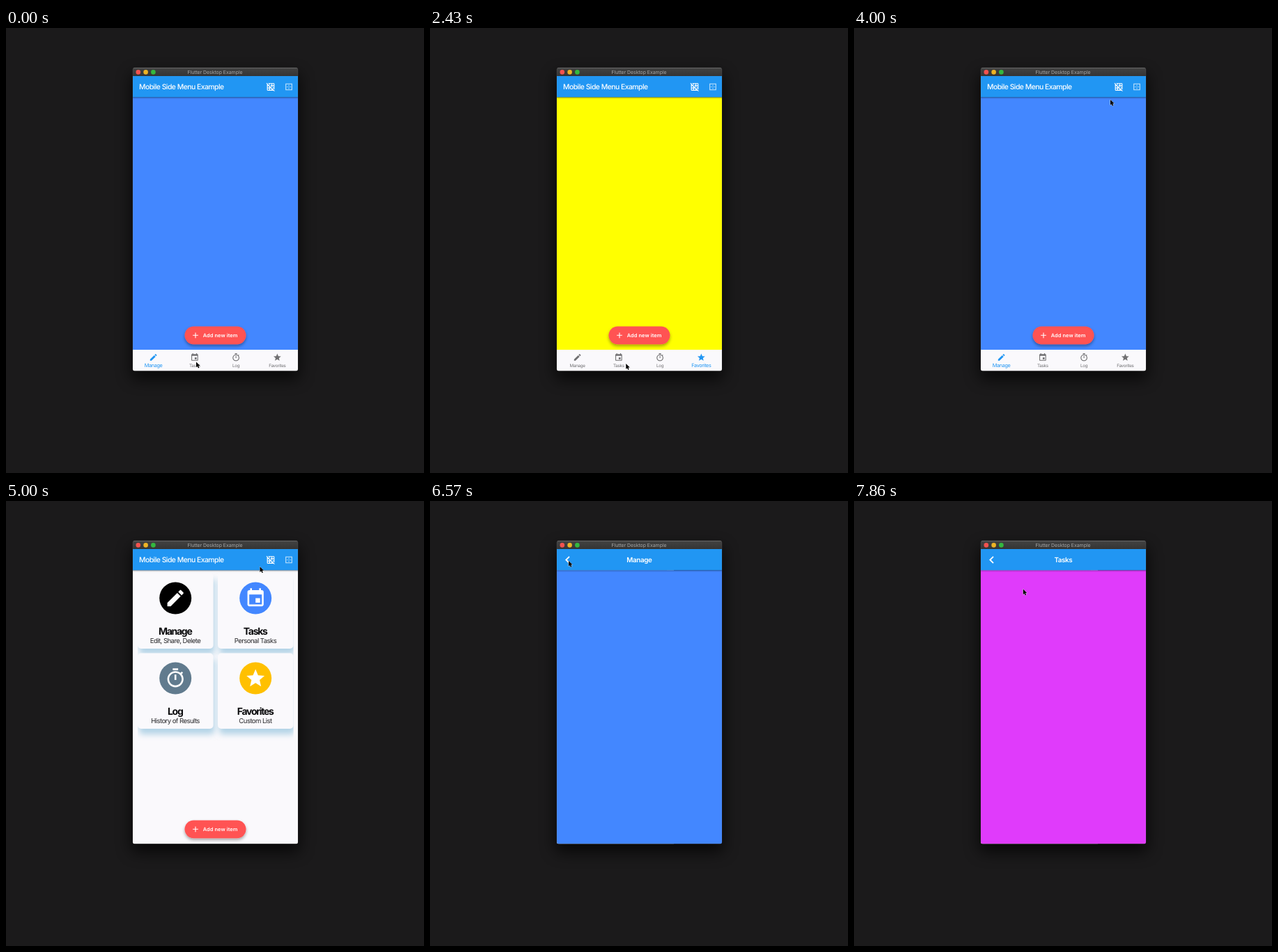
Write an HTML page that moves like this. It is 600 px wide and 639 px high and loops after 8 s.

```html
<!DOCTYPE html>
<html lang="en">
<head>
<meta charset="utf-8">
<title>Side menu demo</title>
<style>
  html, body { margin: 0; width: 100%; height: 100%; overflow: hidden; background: #1b1a1b; }
  svg { display: block; }
  text { font-family: Inter, Roboto, sans-serif; text-rendering: geometricPrecision; }
  .mid { text-anchor: middle; }
  .bar { font-size: 10.4px; font-weight: 500; letter-spacing: -.05em; fill: #fff; }
  .page { font-size: 9.9px; font-weight: 600; letter-spacing: -.04em; fill: #fff; }
  .tab { letter-spacing: -.05em; }
  .head { font-size: 14px; font-weight: 700; letter-spacing: -.09em; fill: #0c0c0e; }
  .sub { font-size: 9.6px; letter-spacing: -.06em; fill: #28282b; }
  .add { font-size: 7.4px; font-weight: 600; letter-spacing: .1px; fill: #fff; }
  .win { font-size: 7px; letter-spacing: -.01em; fill: #a9a9a9; }
</style>
</head>
<body>
<svg id="stage" width="600" height="639" viewBox="0 0 600 639"></svg>
<script>
const LOOP = 8000, FPS = 7;
const X = 182, W = 237, TOP = 69, BODY = 99.3, NAV = 462, END = 492.5;
const BLUE = '#2196f3', PAPER = '#faf9fc';

const icons = {
  edit: 'M3 17.25V21h3.75L17.81 9.94l-3.75-3.75zM20.71 7.04c.39-.39.39-1.02 0-1.41l-2.34-2.34c-.39-.39-1.02-.39-1.41 0l-1.83 1.83 3.75 3.75z',
  event: 'M17 12h-5v5h5zM16 1v2H8V1H6v2H5c-1.1 0-2 .9-2 2v14c0 1.1.9 2 2 2h14c1.1 0 2-.9 2-2V5c0-1.1-.9-2-2-2h-1V1zM19 19H5V8h14z',
  timer: 'M15 1H9v2h6zM11 14h2V8h-2zM19.03 7.39l1.42-1.42c-.43-.51-.9-.99-1.41-1.41l-1.42 1.42C16.07 4.74 14.12 4 12 4c-4.97 0-9 4.03-9 9s4.02 9 9 9 9-4.03 9-9c0-2.12-.74-4.07-1.97-5.61zM12 20c-3.87 0-7-3.13-7-7s3.13-7 7-7 7 3.13 7 7-3.13 7-7 7z',
  star: 'M12 17.27L18.18 21l-1.64-7.03L22 9.24l-7.19-.61L12 2 9.19 8.63 2 9.24l5.46 4.73L5.82 21z',
  gridOff: 'M8 4v1.45l2 2V4h4v4h-3.45l2 2H14v1.45l2 2V10h4v4h-3.45l2 2H20v1.45l2 2V4c0-1.1-.9-2-2-2H4.55l2 2H8zm8 0h4v4h-4V4zM1.27 1.27L0 2.55l2 2V20c0 1.1.9 2 2 2h15.46l2 2 1.27-1.27zM10 12.55L11.45 14H10zM4 6.55L5.45 8H4zM8 20H4v-4h4zM8 14H4v-4h3.45l.55.55zM14 20h-4v-4h3.45l.55.54zM16 20v-1.46L17.46 20z',
  border: 'M13 7h-2v2h2zM13 11h-2v2h2zM17 11h-2v2h2zM3 3v18h18V3zM19 19H5V5h14zM13 15h-2v2h2zM9 11H7v2h2z',
  plus: 'M19 13h-6v6h-2v-6H5v-2h6V5h2v6h6z'
};

const tabs = [
  { name: 'Manage', note: 'Edit, Share, Delete', icon: 'edit', page: '#4387ff', dot: '#000' },
  { name: 'Tasks', note: 'Personal Tasks', icon: 'event', page: '#e03bfb', dot: '#4387ff' },
  { name: 'Log', note: 'History of Results', icon: 'timer', page: '#000', dot: '#617b8e' },
  { name: 'Favorites', note: 'Custom List', icon: 'star', page: '#ff0', dot: '#ffc000' }
];
const tabX = i => X + W / 8 * (2 * i + 1);

// [time, tab]
const clicks = [[-1000, 0], [250, 1], [900, 2], [1300, 3], [2760, 0]];
const GRID_AT = 4400;
// Pages slid over the grid: [tab, opened, closed]
const visits = [[0, 6050, 6850], [1, 7400, 99999]];
// Pointer path: [time, x, y]
const path = [
  [0, 273, 479.5], [430, 277, 481], [710, 331, 480], [860, 331, 480], [1000, 359, 480.5],
  [1290, 388, 480], [1900, 384, 482], [2430, 281, 482], [2710, 213, 480], [3200, 211, 482],
  [4000, 368, 103], [4290, 380, 84], [4860, 380, 84], [5860, 269, 158], [6150, 266, 157],
  [6570, 199, 86], [6860, 197, 84], [7140, 267, 126.5], [7290, 340, 137], [7450, 350, 138], [7860, 242, 126.5]
];

const icon = (name, x, y, size, fill = '#fff', extra = '') =>
  `<path d="${icons[name]}" fill="${fill}" fill-rule="evenodd" ${extra}
    transform="translate(${x} ${y}) scale(${size / 24}) translate(-12 -12)"/>`;
const rect = (x, y, w, h, fill, extra = '') =>
  `<rect x="${x}" y="${y}" width="${w}" height="${h}" fill="${fill}" ${extra}/>`;
const text = (cls, x, y, s, extra = '') => `<text class="${cls}" x="${x}" y="${y}" ${extra}>${s}</text>`;
const barShade = () => rect(X, BODY, W, 3, 'url(#under)');

function tile(tab, i) {
  const x = 189 + i % 2 * 115, y = 103.5 + (i >> 1) * 115, cx = x + 54.2;
  return rect(x, y, 108.5, 108.5, PAPER, 'rx="5" filter="url(#tileShadow)"') +
    `<circle cx="${cx}" cy="${y + 36}" r="23" fill="${tab.dot}"/>` +
    icon(tab.icon, cx, y + 36, 31) +
    text('head mid', cx - .5, y + 88.3, tab.name) + text('sub mid', cx - .2, y + 100, tab.note);
}

const navItem = (tab, i) => `<g class="item">${icon(tab.icon, tabX(i), 473, 12.9, '')}
  ${text('tab mid', tabX(i), 487.3, tab.name)}</g>`;

document.getElementById('stage').innerHTML = `
<defs>
  <clipPath id="frame"><rect x="${X}" y="57" width="${W}" height="${END - 57}" rx="3"/></clipPath>
  <clipPath id="view"><rect x="${X}" y="${TOP}" width="${W}" height="${END - TOP}"/></clipPath>
  <clipPath id="list"><rect x="189" y="${BODY}" width="223.7" height="390"/></clipPath>
  <clipPath id="navClip"><rect x="${X}" y="${NAV}" width="${W}" height="31"/></clipPath>
  <linearGradient id="title" x2="0" y2="1"><stop stop-color="#434343"/><stop offset="1" stop-color="#333"/></linearGradient>
  <linearGradient id="under" x2="0" y2="1"><stop stop-opacity=".25"/><stop offset="1" stop-opacity="0"/></linearGradient>
  <linearGradient id="edge"><stop stop-opacity="0"/><stop offset="1" stop-opacity=".14"/></linearGradient>
  <filter id="tileShadow" x="-30%" y="-30%" width="160%" height="160%">
    <feDropShadow dx="2" dy="8" stdDeviation="4" flood-color="#8cc0dc" flood-opacity=".65"/></filter>
  <filter id="fabShadow" x="-20%" y="-50%" width="140%" height="220%">
    <feDropShadow dx="0" dy="2.5" stdDeviation="2" flood-opacity=".35"/></filter>
  <filter id="blur" x="-30%" y="-30%" width="160%" height="160%"><feGaussianBlur stdDeviation="11"/></filter>
</defs>
${rect(0, 0, 600, 639, '#1b1a1b')}
${rect(X - 2, 66, W + 4, 438, '#000', 'rx="5" opacity=".7" filter="url(#blur)"')}
<g clip-path="url(#frame)">
  ${rect(X, 57, W, 13, 'url(#title)')}${rect(X, 57, W, .7, '#6a6a6a')}
  ${['#f4524e', '#eeb325', '#34b83f'].map((c, i) => `<circle cx="${189.8 + i * 10.8}" cy="63.4" r="3.3" fill="${c}"/>`).join('')}
  ${text('win mid', 300, 66, 'Flutter Desktop Example')}
  <g clip-path="url(#view)">
    <g id="home">
      <g id="tabView">
        ${rect(X, BODY, W, NAV - BODY, '', 'id="body"')}
        ${rect(X, NAV, W, 31, PAPER)}
        <circle id="splash" cy="477" fill="#31506a" clip-path="url(#navClip)"/>
        ${tabs.map(navItem).join('')}
      </g>
      <g id="gridView">${rect(X, BODY, W + 10, END - BODY, PAPER)}
        <g clip-path="url(#list)">${tabs.map(tile).join('')}</g></g>
      ${barShade()}
      ${rect(X, TOP, W, BODY - TOP, BLUE)}
      ${text('bar', 191, 88.2, 'Mobile Side Menu Example')}
      ${icon('gridOff', 380, 84.5, 12.9)}${icon('border', 406, 84.5, 12.9, '#fff', 'opacity=".75"')}
      <g id="fab">${rect(256.5, 428.5, 88, 25.7, '#ff5252', 'rx="12.85" filter="url(#fabShadow)"')}
        ${icon('plus', 272, 441.3, 13.2)}${text('add', 282.7, 444.1, 'Add new item')}</g>
    </g>
    <g id="page">
      ${rect(X - 10, TOP, 10, END - TOP, 'url(#edge)')}
      ${rect(X, BODY, W, END - BODY, '', 'id="pageBody"')}${barShade()}
      ${rect(X, TOP, W, BODY - TOP, BLUE)}
      <path d="M200 79.9L195.3 84.5 200 89.1" fill="none" stroke="#fff" stroke-width="1.8"/>
      ${text('page mid', 300.4, 88.2, '', 'id="pageTitle"')}
    </g>
  </g>
</g>
${rect(X, 57, W, END - 57, 'none', 'rx="3" stroke="#fff" stroke-opacity=".14" stroke-width=".6"')}
<path id="pointer" d="M0 0V7.8L1.8 6.2 3 8.9 4.4 8.3 3.2 5.6H5.6Z" fill="#000" stroke="#fff" stroke-width=".7" paint-order="stroke"/>`;

const el = id => document.getElementById(id);
const items = [...document.querySelectorAll('.item')];
const clamp = v => Math.max(0, Math.min(1, v));
const mix = (a, b, k) => a + (b - a) * k;
const easeOut = u => 1 - (1 - clamp(u)) ** 3;
const show = (id, on) => el(id).setAttribute('visibility', on ? 'visible' : 'hidden');
const move = (id, x, y) => el(id).setAttribute('transform', `translate(${x} ${y})`);
const tint = k => `rgb(${[[112, 33], [112, 150], [114, 243]].map(([a, b]) => Math.round(mix(a, b, k)))})`;

function drawTabs(t) {
  const n = clicks.findLastIndex(c => c[0] <= t);
  const [at, now] = clicks[n], before = n ? clicks[n - 1][1] : now;
  const k = clamp((t - at) / 200);
  el('body').setAttribute('fill', tabs[now].page);
  items.forEach((g, i) => {
    const on = i === now ? k : i === before ? 1 - k : 0;
    g.setAttribute('fill', tint(on));
    g.querySelector('path').setAttribute('fill', tint(on));
    g.querySelector('text').style.fontSize = mix(6.3, 7.3, on) + 'px';
  });
  const age = t - at;
  el('splash').setAttribute('cx', tabX(now));
  el('splash').setAttribute('r', 12 + 14 * clamp(age / 200));
  el('splash').setAttribute('opacity', .08 * clamp((400 - age) / 200));
}

function drawPage(t) {
  const visit = visits.findLast(v => t >= v[1]);
  const cover = visit ? easeOut((t - visit[1]) / 400) - easeOut((t - visit[2]) / 400) : 0;
  show('page', cover > 0);
  move('home', -cover * W / 3, 0);
  if (!visit) return;
  move('page', (1 - cover) * W, 0);
  el('pageBody').setAttribute('fill', tabs[visit[0]].page);
  el('pageTitle').textContent = tabs[visit[0]].name;
}

function drawPointer(t) {
  const n = path.findLastIndex(p => p[0] <= t);
  const a = path[n], b = path[n + 1] || a;
  const k = b === a ? 0 : (t - a[0]) / (b[0] - a[0]);
  move('pointer', mix(a[1], b[1], k), mix(a[2], b[2], k));
}

function draw(ms) {
  const t = Math.floor((ms % LOOP + 5) * FPS / 1000) * 1000 / FPS % LOOP;
  const grid = t >= GRID_AT;
  show('tabView', !grid);
  show('gridView', grid);
  move('fab', 0, grid ? 30 : 0);
  drawTabs(t);
  drawPage(t);
  drawPointer(t);
}

const start = performance.now();
(function tick() {
  draw(performance.now() - start);
  requestAnimationFrame(tick);
})();
</script>
</body>
</html>
```
